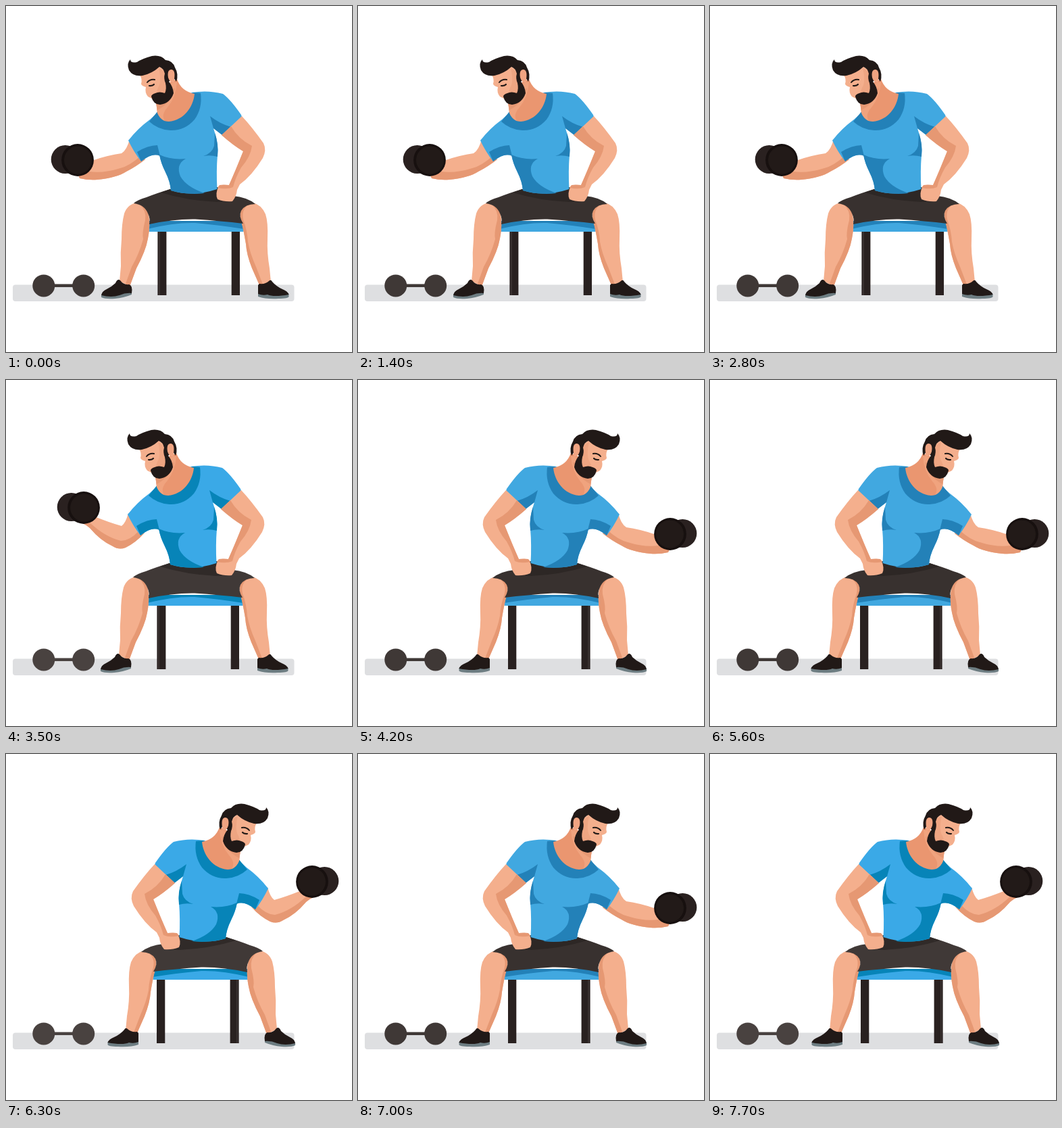
These frames come from a looping animation (512 px wide and 512 px high, 8400 ms). An HTML page with a canvas:

```html
<!DOCTYPE html>
<html lang="en">
<head>
<meta charset="utf-8">
<title>Dumbbell curls</title>
<style>
html, body { margin: 0; width: 100%; height: 100%; overflow: hidden; background: #fff; }
canvas { display: block; width: 100vw; height: 100vh; }
</style>
</head>
<body>
<canvas id="stage" width="512" height="512"></canvas>
<script>
const ctx = document.getElementById('stage').getContext('2d');
const STEP = 700, STEPS = 12, AXIS = 568;
const SKIN = '#f4af8d', SHADE = '#e69873', NECK = '#ea9670', BLACK = '#211917';
const LOW = { blue: '#41a8e0', navy: '#2381b8', dark: '#38312f', deep: '#2d2725', iron: '#3f3836' };
const HIGH = { blue: '#3aa9e7', navy: '#0784b8', dark: '#403937', deep: '#302a28', iron: '#494240' };

function shape(d, color) {
  ctx.fillStyle = color;
  ctx.fill(new Path2D(d));
}

function line(d, color, width) {
  ctx.strokeStyle = color;
  ctx.lineWidth = width;
  ctx.lineCap = 'round';
  ctx.stroke(new Path2D(d));
}

function disk(x, y, r, color) {
  ctx.fillStyle = color;
  ctx.beginPath();
  ctx.arc(x, y, r, 0, Math.PI * 2);
  ctx.fill();
}

function box(x, y, w, h, color, r = 0) {
  ctx.fillStyle = color;
  ctx.beginPath();
  ctx.roundRect(x, y, w, h, r);
  ctx.fill();
}

function floor({ iron }) {
  box(10, 412.5, 416.5, 24.5, '#dedfe1', 4);
  box(70, 411.5, 31, 4.5, iron);
  disk(55.8, 413.9, 16.5, iron);
  disk(114.7, 413.9, 16.5, iron);
}

function bench({ blue, navy }) {
  box(222, 333, 12.3, 95, '#292120');
  box(330.6, 333, 13, 95, '#292120');
  box(340.5, 333, 1, 95, '#4a4341');
  shape('M215 318 H359 L359.5 334 H216.5 Z', blue);
  shape('M215 318 H359 V330 Q318 320 288 321 Q254 324 216 330 Z', navy);
}

function legs() {
  shape('M203 291 Q190 294 184 308 Q180 320 181 344 Q182 365 178 388 L176 409 L193 413 L204 388 Q212 368 213 352 Q216 334 219 322 Q225 303 215 293 Z', SKIN);
  shape('M209 294 Q220 301 217 316 Q211 332 210 349 Q207 366 198 386 L188 412 L193 413 L204 388 Q212 368 213 352 Q216 334 219 322 Q225 303 215 293 Z', SHADE);
  shape('M374 291 Q388 293 393 307 Q397 322 397 345 Q399 365 398 385 L400 407 L385 415 L375 388 Q361 362 358 344 Q352 313 362 298 Z', SKIN);
  shape('M370 294 Q360 302 362 317 Q367 336 365 345 Q371 367 382 386 L391 411 L385 415 L375 388 Q361 362 358 344 Q352 313 362 298 Z', SHADE);
}

function shoes() {
  shape('M149.5 430 V426 L195 423 V430 Q183 434 165 433 Q150 433 149.5 430 Z', '#6d7d82');
  shape('M149.5 427 Q151 422 159 419 Q168 415 174 408 Q176 404 179 407 Q184 412 193 411 L195 413 V426 Q188 429 181 427 Q172 431 149.5 427 Z', BLACK);
  shape('M382 424 L423 422 Q428 427 427 431 Q421 434 407 433 Q394 432 382 427 Z', '#6d7d82');
  shape('M382 425 Q380 414 386 412 Q394 413 399 406 Q403 403 406 410 Q411 415 419 419 Q426 422 427 428 Q412 432 400 428 Q391 424 382 425 Z', BLACK);
}

function shorts({ dark, deep }) {
  shape('M256 268 Q290 279 325 271 Q345 277 360 283 Q374 287 379 292 Q363 294 358 307 Q354 315 356 323 Q320 315 288 315.5 Q250 318 217 322 Q224 311 220 303 Q214 293 199 293 Q211 283 232 281 Z', dark);
  shape('M250 270 L256 268 Q290 279 325 271 L339 276 Q300 288 256 290 L236 289 Z', deep);
}

function curlArm(up) {
  if (up) {
    shape('M386 197 Q390 212 396 216 Q414 211 436 202 Q455 202 456 211 Q449 214 443 219 Q427 238 409 246 Q400 252 390 248 Q374 240 362 226 Z', SKIN);
    shape('M370 223 Q384 238 397 238 Q421 232 443 211 L455 211 Q449 214 443 219 Q427 238 409 246 Q400 252 390 248 Q374 240 362 226 Z', SHADE);
  } else {
    shape('M385 197 Q389 213 397 218 Q418 221 438 228 L462 245 L459 255 Q446 258 433 257 Q404 254 390 245 Q376 238 362 227 Z', SKIN);
    shape('M370 223 Q386 237 399 240 Q424 248 445 245 L461 251 L459 255 Q446 258 433 257 Q404 254 390 245 Q376 238 362 227 Z', SHADE);
  }
}

function weight(up) {
  ctx.save();
  if (up) ctx.translate(-9, -39);
  disk(480.3, 227, 21, '#2a2120');
  disk(462, 228, 23.9, '#17100f');
  disk(461.5, 228, 20.5, '#221a18');
  ctx.restore();
}

function shirt({ blue, navy }) {
  shape('M293 128 Q269 124 247 130 Q236 138 220 161 L219 164 L248 191 L261 181 Q253 204 255 220 Q257 245 255.5 271 Q292 283 324 273 Q325 260 332 246 Q339 232 341 220 Q352 217 368 230 Q379 216 387 199 Q373 181 355 168 L343 157 Z', blue);
  shape('M266 163 Q252 174 235 179 L248 191 Q257 184 261 181 Z', navy);
  shape('M344 206 Q358 206 374 216 L368 230 Q352 217 340 222 Z', navy);
  shape('M259 188 Q253 204 255 223 Q265 220 276 222 Q263 218 260 207 Z', navy);
  shape('M302 226 Q324 228 341 220 Q339 232 332 246 Q325 260 324 273 Q300 280 274 277 Q301 268 310 252 Q317 234 302 226 Z', navy);
}

function neck({ navy }) {
  shape('M291 128 L280 129 Q277 151 289 168 Q304 185 325 184 Q343 183 356 171 L342 154 Z', navy);
  shape('M289 130 Q309 126 315 108 L332 116 L346 142 L344 158 Q339 171 327 171 C305 169 291 150 289 130 Z', NECK);
  shape('M315 112 Q316 134 329 150 Q339 161 333 170 Q341 166 344 158 L346 142 L330 116 Z', '#f0a37e');
  shape('M318 122 Q324 144 344 154 L346 142 L326 124 Z', SHADE);
}

function head() {
  shape('M329 98 L342 89 Q356 97 370 102 Q366 108 368 115 Q368 118 361 120 Q363 128 358 134 L348 139 L327 130 Z', SKIN);
  shape('M329 104 Q336 94 342 92 Q337 112 343 121 L346 130 L329 132 Z', '#eea582');
  shape('M316 112 Q312 101 318 91 Q321 81 332 80 Q339 72 352 74 Q367 78 374 83 Q384 85 384 79 Q390 85 386 95 Q380 105 366 103 Q352 100 341 90 Q335 92 333 100 Q335 107 332 114 Q330 123 333 129 Q341 126 347 129 Q353 131 353 134 Q350 146 340 146 Q325 144 320 129 Q321 119 327 112 L320 106 Z', BLACK);
  shape('M319 108 Q317 95 323 94 Q330 94 328 106 Q325 115 319 113 Z', '#f0a482');
  line('M348 109 Q355 108 359 113', BLACK, 2);
  line('M349 116 Q351 118.5 356 118', BLACK, 2.2);
}

function hipArm() {
  shape('M219 163 Q204 179 187 203 Q182 213 188 225 Q204 251 222 264 L226 272 Q227 282 233 289 Q245 290 255 286 Q259 278 253 266 Q247 264 238 265 Q229 245 217 215 Q232 206 249 191 Z', SKIN);
  shape('M235 178 Q224 197 204 207 Q206 223 220 239 Q229 255 232 268 L238 265 Q229 245 217 215 Q232 206 249 191 Z', SHADE);
  shape('M232 268 Q241 272 255 269 L252 265 Q247 264 238 265 Z', SHADE);
}

function athlete(up, tones) {
  bench(tones);
  legs();
  shoes();
  shorts(tones);
  curlArm(up);
  shirt(tones);
  neck(tones);
  head();
  hipArm();
}

function draw(t) {
  const step = Math.floor(t / STEP) % STEPS;
  const left = step < STEPS / 2;
  const up = step % 2 === 1;
  const tones = up ? HIGH : LOW;
  ctx.fillStyle = '#fff';
  ctx.fillRect(0, 0, 512, 512);
  floor(tones);
  ctx.save();
  if (left) {
    ctx.translate(AXIS, 0);
    ctx.scale(-1, 1);
  }
  ctx.save();
  if (up) ctx.translate(1, 0);
  athlete(up, tones);
  ctx.restore();
  weight(up);
  ctx.restore();
}

const start = performance.now();
function tick() {
  draw(performance.now() - start);
  requestAnimationFrame(tick);
}
tick();
</script>
</body>
</html>
```
